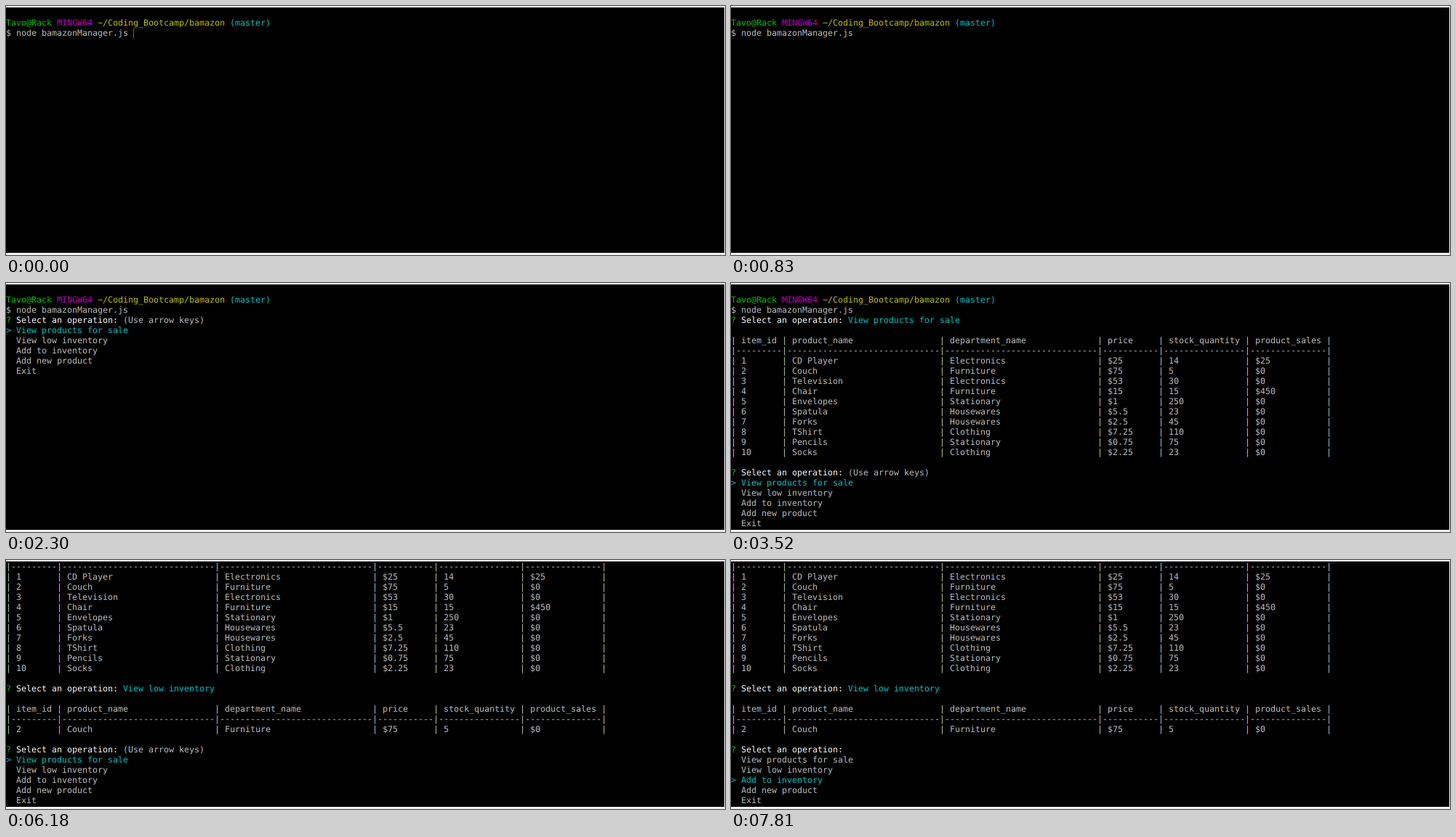
Recreate the animation shown at these times as an HTML page with a canvas. Size 989 px wide and 343 px high, loop 8000 ms.

```html
<!DOCTYPE html>
<html lang="en">
<head>
<meta charset="utf-8">
<title>Terminal inventory manager</title>
<style>
  html, body { margin: 0; width: 100%; height: 100%; overflow: hidden; background: #000; }
  canvas { display: block; }
</style>
</head>
<body>
<canvas id="stage" width="989" height="343"></canvas>
<script>
const ctx = document.getElementById('stage').getContext('2d');
const LOOP = 8000, CELL = 7, LINE = 14, TOP = 3;
const GREY = '#bfbfbf', WHITE = '#ffffff', GREEN = '#00bf00', CYAN = '#00bfbf',
      MAGENTA = '#bf00bf', YELLOW = '#bfbf00';

const OPTIONS = ['View products for sale', 'View low inventory', 'Add to inventory',
                 'Add new product', 'Exit'];
const WIDTHS = [9, 30, 30, 11, 16, 15];
const HEADER = 'item_id,product_name,department_name,price,stock_quantity,product_sales';
const PRODUCTS = `CD Player,Electronics,$25,14,$25
Couch,Furniture,$75,5,$0
Television,Electronics,$53,30,$0
Chair,Furniture,$15,15,$450
Envelopes,Stationary,$1,250,$0
Spatula,Housewares,$5.5,23,$0
Forks,Housewares,$2.5,45,$0
TShirt,Clothing,$7.25,110,$0
Pencils,Stationary,$0.75,75,$0
Socks,Clothing,$2.25,23,$0`.split('\n').map((line, i) => `${i + 1},${line}`);

// A line is a list of [colour, text] runs.
const ask = (colour, answer) =>
  [[GREEN, '? '], [WHITE, 'Select an operation: '], [colour, answer]];

const menu = selected => [
  ask(GREY, selected ? '' : '(Use arrow keys)'),
  ...OPTIONS.map((name, i) => [i === selected ? [CYAN, '> ' + name] : [GREY, '  ' + name]])
];

const fence = cells => [[GREY, `|${cells.join('|')}|`]];
const rule = fence(WIDTHS.map(w => '-'.repeat(w)));
const tableRow = csv => fence(csv.split(',').map((cell, i) => (' ' + cell).padEnd(WIDTHS[i])));
const table = rows => [[], tableRow(HEADER), rule, ...rows.map(tableRow), []];

const shell = [
  [],
  [[GREEN, 'Tavo@Rack '], [MAGENTA, 'MINGW64 '],
   [YELLOW, '~/Coding_Bootcamp/bamazon '], [CYAN, '(master)']],
  [[GREY, '$ node bamazonManager.js']]
];
const allListed = [...shell, ask(CYAN, OPTIONS[0]), ...table(PRODUCTS)];
const lowListed = [...allListed, ask(CYAN, OPTIONS[1]), ...table([PRODUCTS[1]])];

const screens = [
  [0, shell],
  [2300, [...shell, ...menu(0)]],
  [3520, [...allListed, ...menu(0)]],
  [4770, [...allListed, ...menu(1)]],
  [6180, [...lowListed, ...menu(0)]],
  [7340, [...lowListed, ...menu(1)]],
  [7810, [...lowListed, ...menu(2)]]
];
const pointerPath = [[70, 931, 301], [110, 934, 296], [280, 937, 299], [355, 940, 297], [430]];

const latest = (steps, t) => steps.filter(step => step[0] <= t).pop();

function box(colour, x, y, w, h) {
  ctx.fillStyle = colour;
  ctx.fillRect(x, y, w, h);
}

// Subpixel text: red, green and blue are laid down a third of a pixel apart.
function drawText(colour, text, col, y) {
  const [r, g, b] = colour.match(/\w\w/g);
  const layers = [[`#${r}0000`, 1 / 3], [`#00${g}00`, 0], [`#0000${b}`, -1 / 3]];
  for (const [tint, shift] of layers) {
    ctx.fillStyle = tint;
    [...text].forEach((ch, i) => ctx.fillText(ch, CELL * (col + i) + shift, y));
  }
}

function drawLine(runs, row) {
  let col = 0;
  for (const [colour, text] of runs) {
    drawText(colour, text, col, TOP + LINE * row + 10);
    col += text.length;
  }
}

function drawCaret(t) {
  if (t >= 2300 || (t >= 830 && t < 1370)) return;
  const entered = t >= 1750;
  const x = entered ? 0 : 25 * CELL, y = TOP + LINE * (entered ? 3 : 2);
  if (t >= 355) box(GREY, x, y, 1, LINE);
  else for (let i = 0; i < LINE; i += 2) box(GREY, x, y + i, 1, 1);
}

function drawPointer(t) {
  const [, x, y] = latest(pointerPath, t) || [];
  if (!x) return;
  box(GREY, x, y, 7, 1);
  box(GREY, x + 3, y, 1, 16);
  box(GREY, x, y + 15, 7, 1);
}

function draw(t) {
  box('#000', 0, 0, 989, 343);
  ctx.font = '11.63px "DejaVu Sans Mono", monospace';
  ctx.textRendering = 'geometricPrecision';
  ctx.globalCompositeOperation = 'lighter';
  latest(screens, t)[1].slice(-24).forEach(drawLine);
  ctx.globalCompositeOperation = 'source-over';
  drawCaret(t);
  drawPointer(t);
  box('#f0f0f0', 0, 0, 989, 2);
  box('#f0f0f0', 0, 340, 989, 3);
  box('#f0f0f0', 988, 0, 1, 343);
}

function tick() {
  draw(performance.now() % LOOP);
  requestAnimationFrame(tick);
}
tick();
</script>
</body>
</html>
```
